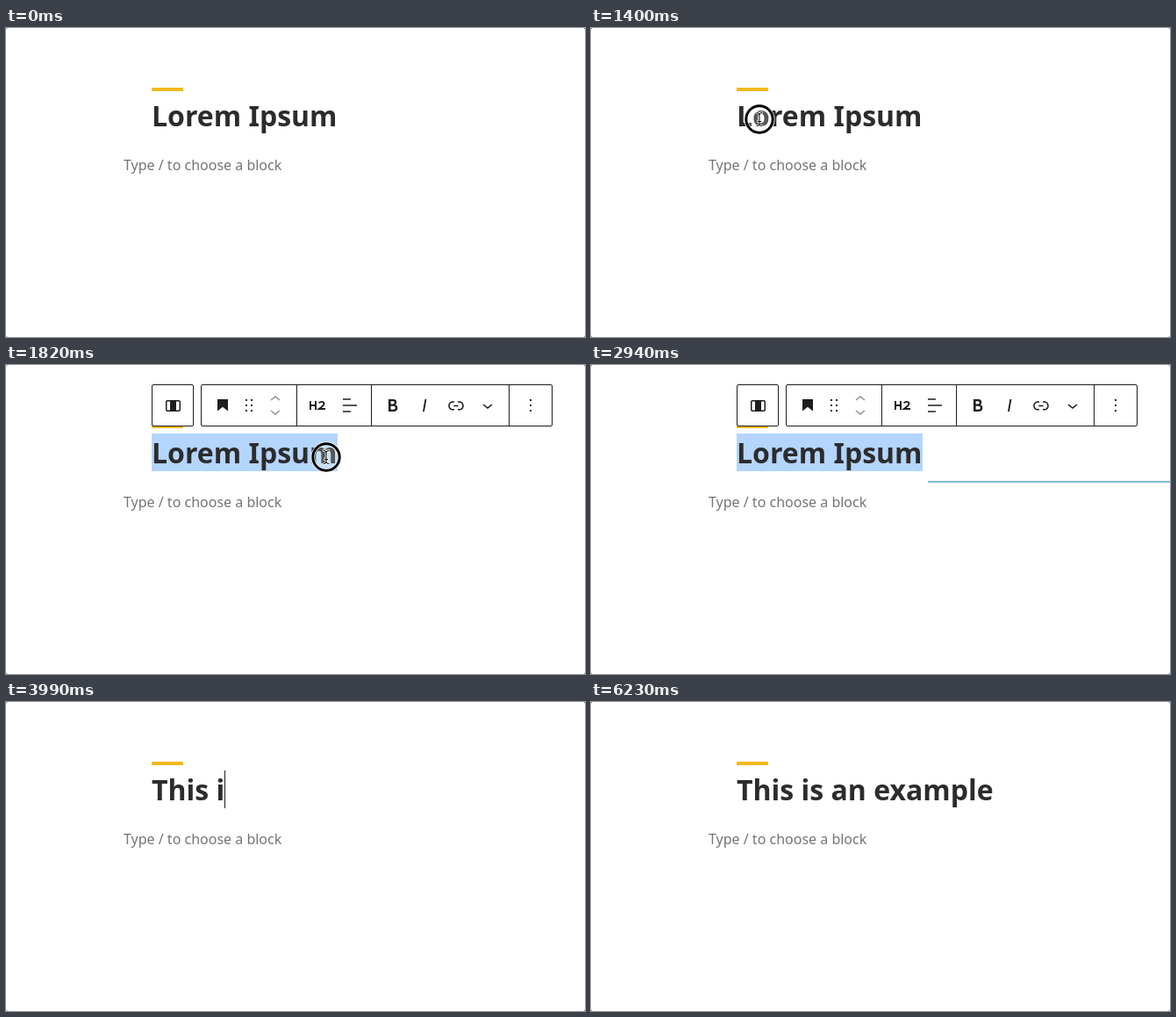
An HTML page for the animation above (6650 ms loop, 660 px wide and 352 px high).

```html
<!DOCTYPE html>
<html lang="en">
<head>
<meta charset="utf-8">
<title>Editing a heading</title>
<style>
  html, body { margin: 0; width: 100%; height: 100%; overflow: hidden; background: #777; }
  #stage { position: relative; width: 660px; height: 352px; overflow: hidden; background: #fff;
    border-radius: 2.5px; font-family: "Noto Sans", sans-serif; white-space: pre; }
  #stage > * { position: absolute; margin: 0; }
  #accent { left: 166px; top: 68px; width: 36px; height: 4px; background: #f2b91d; }
  h2 { left: 166px; top: 78px; font-size: 32px; line-height: 43px; font-weight: 700; color: #2c2c2c; }
  #picked { background: #b4d5fe; }
  #hint { left: 134px; top: 145px; font-size: 16px; line-height: 22px; color: #757575; }
  .caret { width: 1px; background: #1e1e1e; }
  h2 .caret { position: absolute; right: -1px; top: 0; height: 43px; }
  #hintCaret { left: 134px; top: 145px; height: 22px; }
  #inserter { right: 0; top: 131.5px; height: 2px; background: #7dbad8; }
  svg { left: 0; top: 0; }
  #bar { fill: #1e1e1e; }
  #bar .box { fill: #fff; stroke: #1e1e1e; }
  #bar .off { fill: #949494; }
</style>
</head>
<body>
<div id="stage">
  <div id="accent"></div>
  <h2><span id="picked"></span><span id="rest"></span><i class="caret" id="caret"></i></h2>
  <p id="hint">Type / to choose a block</p>
  <i class="caret" id="hintCaret"></i>
  <div id="inserter"></div>
  <svg width="660" height="352">
    <defs>
      <path id="down" d="M17.5 11.6L12 16l-5.5-4.4.9-1.2L12 14l4.5-3.6 1 1.2z"/>
    </defs>
    <g id="bar">
      <rect class="box" x="166.5" y="22.5" width="47" height="47" rx="1.5"/>
      <rect class="box" x="222.5" y="22.5" width="400" height="47" rx="1.5"/>
      <path class="box" d="M331.5 22v48M416.5 22v48M573.5 22v48"/>
      <!-- column -->
      <path transform="translate(178 34)" d="M19 6H6c-1.1 0-2 .9-2 2v9c0 1.1.9 2 2 2h13c1.1 0 2-.9 2-2V8c0-1.1-.9-2-2-2zM6 17.5c-.3 0-.5-.2-.5-.5V8c0-.3.2-.5.5-.5h3v10H6zm13.5-.5c0 .3-.2.5-.5.5h-3v-10h3c.3 0 .5.2.5.5v9z"/>
      <!-- heading, drag handle, movers -->
      <path transform="translate(235 34)" d="M6 5v13.6l6-4.75 6 4.75V5z"/>
      <path transform="translate(265 34)" d="M8 5h2v2H8zm0 6h2v2H8zm0 6h2v2H8zm6-12h2v2h-2zm0 6h2v2h-2zm0 6h2v2h-2z"/>
      <path class="off" transform="translate(295 27)" d="M6.5 12.4L12 8l5.5 4.4-.9 1.2L12 10l-4.5 3.6-1-1.2z"/>
      <use class="off" href="#down" x="295" y="41"/>
      <!-- level -->
      <g transform="translate(345 36)">
        <path d="M1 5h2v4h4V5h2v10H7v-4H3v4H1z"/>
        <path fill="none" stroke="#1e1e1e" stroke-width="1.9" d="M11.6 7.3Q13 5.9 14.7 5.9C16.4 5.9 17.5 6.8 17.5 8.1 17.5 10.2 14.5 12.2 11.8 14H19"/>
      </g>
      <!-- align, bold, italic, link, more -->
      <path transform="translate(380 34)" d="M4 4.2h8.9v1.5H4zm0 7h16v1.5H4zm0 7.1h8.9v1.5H4z"/>
      <path transform="translate(429 34)" d="M14.7 11.3c1-.6 1.5-1.6 1.5-3 0-2.3-1.3-3.4-4-3.4H7v14h5.8c1.4 0 2.5-.3 3.3-1 .8-.7 1.2-1.7 1.2-2.9.1-1.9-.8-3.1-2.6-3.7zm-5.1-4h2.3c.6 0 1.1.1 1.4.4.3.3.5.7.5 1.2s-.2 1-.5 1.2c-.3.3-.8.4-1.4.4H9.6V7.3zm4.6 9c-.4.3-1 .4-1.7.4H9.6v-3.9h2.9c.7 0 1.3.2 1.7.5.4.3.6.8.6 1.5s-.2 1.2-.6 1.5z"/>
      <path transform="translate(465 34)" d="M12.5 5L10 19h1.9l2.5-14z"/>
      <path transform="translate(501 34)" d="M15.6 7.2H14v1.5h1.6c2 0 3.7 1.7 3.7 3.7s-1.7 3.7-3.7 3.7H14v1.5h1.6c2.8 0 5.2-2.3 5.2-5.2 0-2.9-2.3-5.2-5.2-5.2zM4.7 12.4c0-2 1.7-3.7 3.7-3.7H10V7.2H8.4c-2.9 0-5.2 2.3-5.2 5.2 0 2.9 2.3 5.2 5.2 5.2H10v-1.5H8.4c-2 0-3.7-1.7-3.7-3.7zm4.6.9h5.3v-1.5H9.3v1.5z"/>
      <use href="#down" x="537" y="34"/>
      <path transform="translate(586 34)" d="M11 5h2v2h-2zm0 6h2v2h-2zm0 6h2v2h-2z"/>
    </g>
    <g id="mouse" fill="none">
      <g id="ring">
        <circle r="15.3" fill="#fff" fill-opacity=".2" stroke="#fff" stroke-width="4.4"/>
        <circle r="15.2" stroke="#000" stroke-width="3"/>
      </g>
      <g id="beam" stroke-linecap="round">
        <path id="beamShape" stroke="#fff" stroke-width="2.6" d="M-3-7.5Q0-7.5 0-5.5Q0-7.5 3-7.5M0-5.5V5.5M-3 7.5Q0 7.5 0 5.5Q0 7.5 3 7.5M-1.8 2.5h3.6"/>
        <path stroke="#000" d="M-3-7.5Q0-7.5 0-5.5Q0-7.5 3-7.5M0-5.5V5.5M-3 7.5Q0 7.5 0 5.5Q0 7.5 3 7.5M-1.8 2.5h3.6"/>
      </g>
      <path id="arrow" fill="#000" stroke="#fff" d="M-5.5-8.5v15l3.5-3.3 2.3 5.3 2.4-1-2.3-5.2h5z"/>
    </g>
  </svg>
</div>
<script>
const LOOP = 6650, TICK = 70;
const BEFORE = "Lorem Ipsum", AFTER = "This is an example";
const KEYS = [3010, 3360, 3500, 3710, 3850, 3990, 4060, 4130, 4340,
  4550, 4760, 4900, 5110, 5320, 5460, 5530, 5600, 5670];
// time, x, y of the pointer's centre
const PATH = [[70, 338, 336], [420, 261, 102], [490, 261, 102], [560, 270, 86], [630, 258, 95],
  [840, 258, 95], [1120, 172, 105], [1330, 172, 105], [1400, 192, 104], [1820, 365, 105],
  [1960, 365, 105], [2030, 369, 105], [2170, 369, 105], [2240, 379, 144]];

const $ = id => document.getElementById(id);
const show = (id, on) => { $(id).style.visibility = on ? "visible" : "hidden"; };
const pen = document.createElement("canvas").getContext("2d");
pen.font = '700 32px "Noto Sans", sans-serif';

function pointer(t) {
  const i = PATH.findIndex(p => p[0] > t);
  if (i < 0) return PATH[PATH.length - 1].slice(1);
  if (i === 0) return PATH[0].slice(1);
  const [t0, x0, y0] = PATH[i - 1], [t1, x1, y1] = PATH[i];
  const k = (t - t0) / (t1 - t0);
  return [x0 + (x1 - x0) * k, y0 + (y1 - y0) * k];
}

// Letters whose middle lies left of x
function lettersUpTo(x) {
  const edge = n => 166 + pen.measureText(BEFORE.slice(0, n)).width;
  let n = 0;
  while (n < BEFORE.length && (edge(n) + edge(n + 1)) / 2 < x) n++;
  return n;
}

function draw(now) {
  const t = Math.floor(now % LOOP / TICK) * TICK;
  const [x, y] = pointer(t);
  const typed = KEYS.filter(k => k <= t).length;
  const selecting = t >= 1470 && !typed;
  const cut = selecting ? lettersUpTo(x) : 0;

  $("picked").textContent = BEFORE.slice(0, cut);
  $("rest").textContent = typed ? AFTER.slice(0, typed) : BEFORE.slice(cut);
  show("caret", typed && t < 6230);
  show("hintCaret", t >= 560 && t < 1050);
  show("bar", selecting);

  const grow = Math.min(1, (t - 2730) / 210);
  show("inserter", grow > 0 && !typed);
  $("inserter").style.width = 276 * grow + "px";
  $("inserter").style.opacity = grow;

  const seen = t >= 70 && t < 2870, overText = y < 122 || (y > 146 && y < 168);
  $("mouse").setAttribute("transform", `translate(${x} ${y})`);
  show("ring", t >= 1330 && t < 2100);
  show("beam", seen && overText);
  show("arrow", seen && !overText);
}

function frame() {
  draw(performance.now());
  requestAnimationFrame(frame);
}
frame();
</script>
</body>
</html>
```
